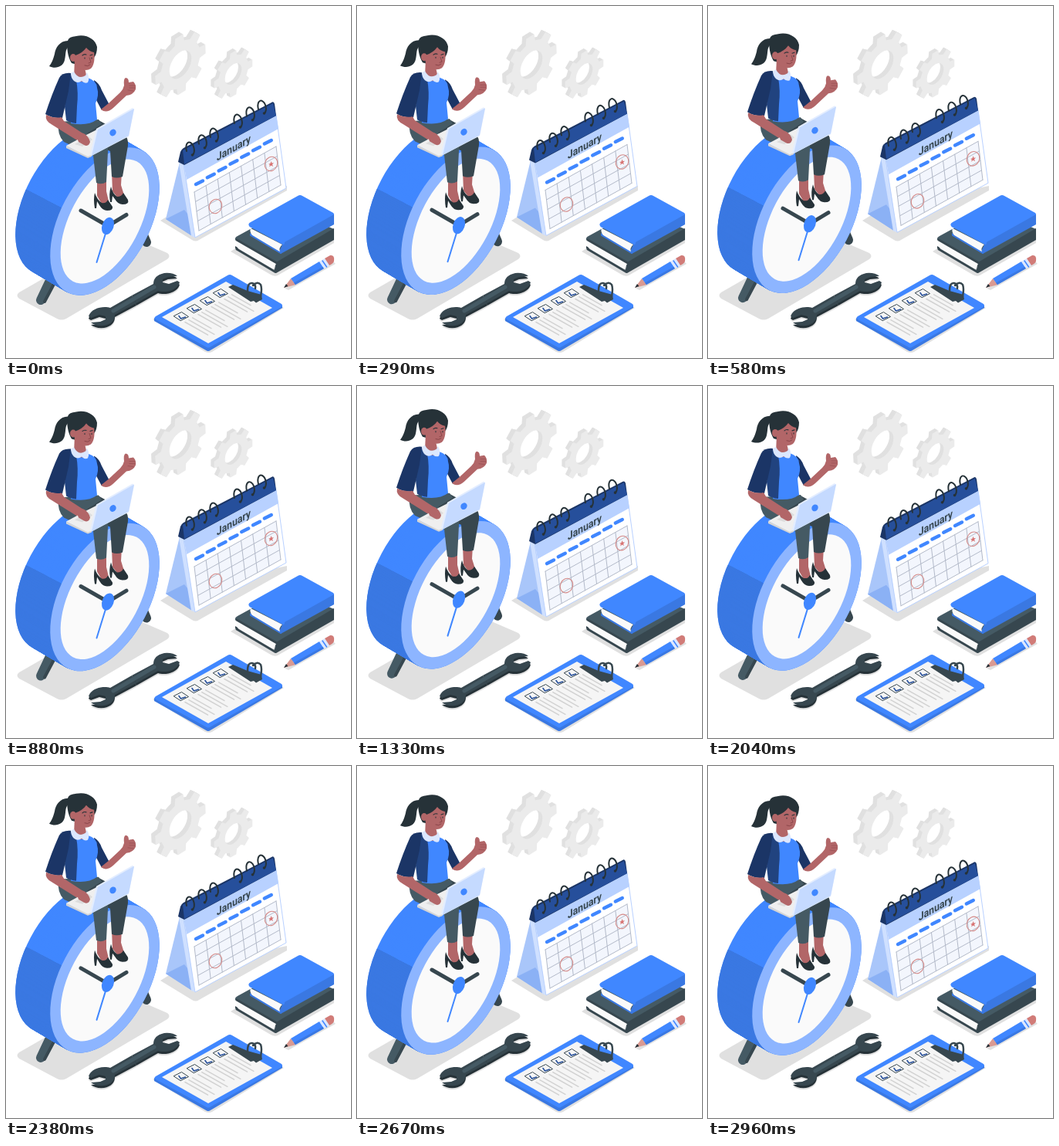
Animation of 447 by 456 pixels, one loop 3000 ms. Source, as an HTML page:

```html
<!DOCTYPE html>
<html lang="en">
<head>
<meta charset="utf-8">
<title>Time planning</title>
<style>
html, body { margin: 0; width: 100%; height: 100%; overflow: hidden; background: #fff; }
svg { display: block; width: 447px; height: 456px; }
.shadow { fill: #e0e0e0; }
.blue { fill: #4087ff; }
.deep { fill: #3a78e2; }
.pale { fill: #8db5ff; }
.navy { fill: #1b3566; }
.slate { fill: #455a64; }
.dark { fill: #37474f; }
.ink { fill: #263238; }
.skin { fill: #b26668; }
.paper { fill: #fafafa; }
.line { fill: none; stroke-linecap: round; stroke-linejoin: round; }
.month { font: 700 14px Roboto, "Open Sans", sans-serif; fill: #37474f; }
</style>
</head>
<body>
<svg viewBox="0 0 447 456" xmlns="http://www.w3.org/2000/svg">
  <defs>
    <clipPath id="lowerSide"><path d="M0 224L80 266V400H0Z"/></clipPath>
    <path id="wrenchEnd" d="M163 375L135 391C127 388 110 391 107 402L110 404L121 400L129 402V406L122 409L110 410Q116 415 127 414Q141 411 141 400L169 385Z"/>
    <g id="wrenchShape">
      <use href="#wrenchEnd"/>
      <use href="#wrenchEnd" transform="rotate(180 166 380)"/>
    </g>
  </defs>

  <g id="gears"></g>

  <g class="shadow">
    <path d="M17 371L146 297Q151 294 156 297L209 320Q214 324 209 328L78 405Q72 408 66 405L17 379Q12 375 17 371Z"/>
    <path d="M200 278L226 262L364 233L364 239L250 303Q246 306 241 303Z"/>
    <path d="M291 318L310 306L425 296V307L352 349Q348 351 343 348Z"/>
    <path d="M361 366L424 331L427 334L366 368Z"/>
    <path d="M190 406L291 352L360 391L267 448Q263 450 258 448Z"/>
    <use href="#wrenchShape" y="5"/>
  </g>

  <g id="calendar">
    <path fill="#a9c6fa" d="M228 190L207 276L243 299L236 210Z"/>
    <path fill="#8bb1f5" d="M207 276L231 264L239 274L241 298Z"/>
    <path fill="#cfe0ff" d="M224 203L229 200L245 300L240 298Z"/>
    <path fill="#fff" stroke="#b9d1ff" d="M230 204L350 142L363 236L245 300Z"/>
    <path fill="#b8d1ff" d="M230 204L350 141L353 159L234 225Z"/>
    <path class="navy" d="M223 202L226 189Q227 186 230 184L344 125Q347 123 348 127L350 142L231 206Z"/>
    <path fill="#264f9b" d="M229 187L346 126L350 142L231 205Z"/>
    <text class="month" transform="matrix(.87 -.49 .03 1 273 201)">January</text>
    <g id="dates"></g>
    <g class="line" stroke="#d58a88" stroke-width="1.100">
      <ellipse cx="271.500" cy="259.500" rx="8" ry="9.500" transform="rotate(25 271.500 259.500)"/>
      <ellipse cx="343.500" cy="204.500" rx="8" ry="9.500" transform="rotate(25 343.500 204.500)"/>
    </g>
    <path fill="#d87473" d="M343.500 201L344.500 203.500L347 203.300L345 205.300L346 208L343.500 206.500L341.200 208.500L341.800 205.700L340.200 204.700L342.500 204Z"/>
    <g id="coils" class="line" stroke="#263238" stroke-width="2"></g>
  </g>

  <g id="books">
    <path class="slate" d="M297 303Q296 300 300 298L364 263L425 289L351 333Z"/>
    <path class="dark" d="M350 332L425 288V303L350 346L297 314V311L348 341Z"/>
    <path class="paper" d="M300 305L350 334Q346 338 348 343L302 316Q297 310 300 305Z"/>
    <path class="line" stroke="#37474f" stroke-width="3" d="M349 344.500L299 315M299 303L351 333"/>
    <path class="blue" d="M315 285Q313 282 317 280L378 246Q381 244 384 246L424 268Q426 270 424 272L361 308Z"/>
    <path class="deep" d="M359 307L425 270V283L356 321L316 297V294L354 318Z"/>
    <path class="paper" d="M317 288L358 309Q353 313 355 319L319 297Q315 292 317 288Z"/>
    <path class="line" stroke="#4087ff" stroke-width="4" d="M317 284.500L359 307"/>
    <path class="line" stroke="#3a78e2" stroke-width="2" d="M317 297L356 320"/>
  </g>

  <g id="pencil">
    <path fill="#d99a92" d="M360 365L369 353L376 361Z"/>
    <path class="ink" d="M360 365L363 360L365.500 363Z"/>
    <path class="blue" d="M369 353L406 331L412 340L375 361Z"/>
    <path class="deep" d="M373 358.500L411 337.500L412 340L375 361Z"/>
    <path fill="#dbe7ff" d="M406 331L413 327L419 336L412 340Z"/>
    <path class="line" stroke="#4087ff" stroke-width="1.500" d="M410 330L415.500 338"/>
    <path fill="#d17c78" d="M413 327L420 323Q426 322 425 330Q425 333 419 336Z"/>
  </g>

  <use href="#wrenchShape" class="ink" y="3"/>
  <use href="#wrenchShape" class="dark"/>
  <path class="line" stroke="#455a64" stroke-width="5" d="M139 395L192 364"/>

  <g id="clipboard">
    <path class="deep" d="M192 404L262 442L358 388V391L264 446.500Q262 447.500 260 446.500L192 408Z"/>
    <path class="blue" d="M194 402L287 349Q290 347 293 349L357 386Q359 388 357 390L264 442Q262 443 260 442L194 406Q191 404 194 402Z"/>
    <path fill="#f5f5f5" d="M202 403L285 357L345 391L262 437Z"/>
    <g id="checklist"></g>
    <path class="dark" d="M288 364L294 361L313 369L331 374L332 380L324 384.500L321 382L317 383Z"/>
    <path class="line" stroke="#37474f" stroke-width="2.500" d="M313 369Q313 358 319 359Q324 360 323 366M320 362Q326 356 330 361Q332 366 330 376"/>
  </g>

  <g id="sitter">
    <g class="line" stroke-width="12">
      <path stroke="#455a64" d="M62 345L45 381"/>
      <path stroke="#37474f" d="M173 285L182 306"/>
    </g>
    <path class="line" stroke="#37474f" stroke-width="4" d="M67 351L50 383"/>
    <g id="clockSide" class="blue"></g>
    <g id="clockShade" class="deep" clip-path="url(#lowerSide)"></g>
    <g transform="translate(128 279) rotate(-62)">
      <ellipse class="pale" rx="104" ry="58"/>
      <ellipse class="paper" rx="88" ry="45"/>
    </g>
    <path class="line" stroke="#37474f" stroke-width="5" d="M97 265L132 285L156 270.500"/>
    <ellipse class="blue" cx="132" cy="285" rx="7.500" ry="11.500" transform="rotate(20 132 285)"/>
    <path class="line" stroke="#4087ff" stroke-width="2" d="M117.500 332L132 285"/>

    <g id="woman">
      <path class="skin" d="M137 215H150L149 232L153 245L146 250L138 240ZM118 224H130L130 240L133 253L125 258L118 246Z"/>
      <path class="ink" d="M136 234Q138 243 144 247Q150 247 152 242Q156 248 158 251Q160 257 151 257Q145 257 141 250L138 246L137 254H135Q133 243 136 234ZM115 242Q118 251 124 255Q130 256 132 251Q136 257 138 260Q139 265 131 265Q125 265 121 258L118 253L117 262H115Q113 250 115 242Z"/>
      <path class="dark" d="M98 149L120 148L153 166Q159 171 158 181L151 221Q143 224 137 221L135 188L96 174Z"/>
      <path class="slate" d="M68 150L120 147L124 153L105 165L128 175Q133 179 132 189L130 228Q124 232 117 229L113 194L75 176Q66 167 68 150Z"/>

      <path class="navy" d="M114 96Q121 100 124 109L134 128L124 135L116 120Z"/>
      <path class="skin" d="M123 134L133 126L148 112Q152 108 153 103Q152 94 155 93Q159 93 159 99L165 98Q169 102 168 108Q165 115 156 116L139 132Q130 140 123 134Z"/>
      <path class="line" stroke="#9a5054" stroke-width=".8" d="M160 103L167 103M160 106L167 106M158 109L165 110"/>
      <path class="blue" d="M82 92L106 93Q118 97 118 106Q121 115 116 126L118 147Q106 156 84 152Z"/>
      <path fill="#21437f" d="M83 87L91 96Q94 112 92 130L91 152Q83 151 78 148L76 130Z"/>
      <path class="navy" d="M84 87Q73 86 69 93Q59 115 51 140Q60 146 73 145L81 110Z"/>
      <path class="skin" d="M52 141Q62 146 72 144L75 149L98 164Q107 167 109 176Q107 183 101 179L92 174L60 154Q50 149 52 141Z"/>

      <path class="ink" d="M82 45C70 44 64 54 63 62C61 70 59 74 56 78C64 82 74 79 76 70C78 62 76 56 82 52Z"/>
      <path class="ink" d="M85 74C80 66 78 53 80 45C82 39 88 40 91 39C104 36 116 43 118 53Q118 62 114 67L102 62L92 76Z"/>
      <path class="skin" d="M89 69L88 92Q98 103 105 94L102 80Z"/>
      <path class="skin" d="M90 64Q99 61 104 54Q108 59 114 60C115 66 115 76 110 81Q104 85 96 81Q90 78 88 70Z"/>
      <ellipse class="skin" cx="87" cy="67" rx="4" ry="5"/>
      <path class="line" stroke="#263238" stroke-width="1.100" d="M99 64Q101 62 104 63M109 64L112 63M102 67V68M111 67V68"/>
      <path class="line" stroke="#8a4549" stroke-width="1" d="M108 67L110 73L107 74M102 77Q106 79 109 76"/>
      <path fill="#dbe7ff" d="M84 87L88 85Q94 96 103 90L105 86Q109 93 106 99Q102 101 98 97Q93 101 88 97Q84 93 84 87Z"/>

      <path fill="#d5d5d5" d="M78 181L106 194L111 191V195L106 197L78 184Z"/>
      <path fill="#efefef" d="M78 181L106 166L118 160L111 193L106 195Z"/>
      <path fill="#dcdcdc" d="M89 179L107 169L112 173L99 182Z"/>
      <path class="skin" d="M91 168L100 165Q107 168 109 176Q107 183 101 180L94 176Z"/>
      <path fill="#e3edff" d="M117 159L164 132L166 134L159 169L111 194L109 192Z"/>
      <path fill="#c5daff" d="M119 160L166 133L159 168L111 194Z"/>
      <ellipse class="blue" cx="138.500" cy="164" rx="4" ry="4.600" transform="rotate(35 138.500 164)"/>
    </g>
  </g>
</svg>

<script>
const LOOP = 3000;
const $ = id => document.getElementById(id);

function add(parent, tag, attrs) {
  const node = document.createElementNS('http://www.w3.org/2000/svg', tag);
  for (const key in attrs) node.setAttribute(key, attrs[key]);
  parent.append(node);
  return node;
}

const range = n => [...Array(n).keys()];
const lerp = (a, b, t) => a + (b - a) * t;

// Cog outline with a round hole, lying on the isometric plane.
function gear(cx, cy, r, hole, teeth, depth, turn) {
  const step = 2 * Math.PI / teeth;
  const profile = [[0.78, -0.3], [1, -0.2], [1, 0.2], [0.78, 0.3]];
  const points = range(teeth).flatMap(i => profile.map(([k, a]) => {
    const angle = turn + (i + a) * step;
    return (r * k * Math.cos(angle)).toFixed(1) + ' ' + (r * k * Math.sin(angle)).toFixed(1);
  }));
  const d = `M${points.join('L')}ZM${-hole} 0a${hole} ${hole} 0 1 0 ${2 * hole} 0a${hole} ${hole} 0 1 0 ${-2 * hole} 0Z`;
  for (let k = depth; k >= 0; k--) {
    add($('gears'), 'path', {
      d, 'fill-rule': 'evenodd', fill: k ? '#e0e0e0' : '#ebebeb',
      transform: `matrix(.866 -.5 0 1 ${cx - k * 0.866} ${cy - k * 0.5})`
    });
  }
}

// Cylinder: the rear ellipse joined to the front one.
function clockSide(parent) {
  for (const k of range(46)) {
    add(parent, 'ellipse', {
      rx: 104, ry: 58,
      transform: `translate(${83 + k} ${252.5 + k * 26.5 / 45}) rotate(-62)`
    });
  }
}

function dates() {
  const parent = $('dates');
  const at = (u, v) => [lerp(244, 350, u) + 6 * v, lerp(241, 182, u) + 50 * v].join(' ');
  const rows = range(5).map(i => `M${at(0, i / 4)}L${at(1, i / 4)}`);
  const columns = range(8).map(i => `M${at(i / 7, 0)}L${at(i / 7, 1)}`);
  add(parent, 'path', { d: `M${at(0, 0)}L${at(1, 0)}L${at(1, 1)}L${at(0, 1)}Z`, fill: '#f3f6fd' });
  add(parent, 'path', { d: rows.concat(columns).join(''), class: 'line', stroke: '#b3bac9', 'stroke-width': 1 });
  for (const i of range(7)) {
    add(parent, 'path', {
      d: `M${246 + i * 14.8} ${231 - i * 8.75}l9 -4.500`,
      class: 'line', stroke: '#4087ff', 'stroke-width': 4.4
    });
  }
}

function coils() {
  for (const x of [237, 253, 268, 299, 315, 330]) {
    const y = 177 - (x - 237) * 0.58;
    add($('coils'), 'path', { d: `M${x - 3} ${y + 11}C${x - 5} ${y + 3} ${x - 2} ${y - 2} ${x + 2} ${y}C${x + 6} ${y + 2} ${x + 9} ${y + 11} ${x + 5} ${y + 16}` });
    add($('coils'), 'circle', { cx: x + 4.5, cy: y + 16, r: 0.8 });
  }
}

function checklist() {
  const parent = $('checklist');
  for (const i of range(4)) {
    const x = 227 + 17 * i, y = 401.5 - 10 * i;
    add(parent, 'path', { d: `M${x - 9.5} ${y}l10 -5l9 6l-10 5Z`, class: 'line', stroke: '#37474f', 'stroke-width': 1 });
    add(parent, 'path', { d: `M${x - 3} ${y}l2.500 3.500l6 -2`, class: 'line', stroke: '#264f9b', 'stroke-width': 1.6 });
    for (const j of range(3)) {
      const length = [34, 38, 28][j];
      add(parent, 'path', {
        d: `M${x + 5 + 4.8 * j} ${y + 8 - 2.8 * j}l${length * 0.87} ${length * 0.49}`,
        class: 'line', stroke: '#d2d2d2', 'stroke-width': 1.5
      });
    }
  }
}

gear(226, 76, 38, 16.5, 8, 6, -0.05);
gear(294.5, 88, 29, 12.5, 8, 5, 0);
clockSide($('clockSide'));
clockSide($('clockShade'));
dates();
coils();
checklist();

const rise = (time, period, height) => -height * (1 - Math.cos(2 * Math.PI * time / period)) / 2;

function draw(now) {
  const time = now % LOOP;
  $('sitter').setAttribute('transform', `translate(0 ${rise(time, LOOP, 8.6)})`);
  $('calendar').setAttribute('transform', `translate(0 ${rise(time, LOOP / 2, 7.6)})`);
  requestAnimationFrame(draw);
}
draw(0);
</script>
</body>
</html>
```
